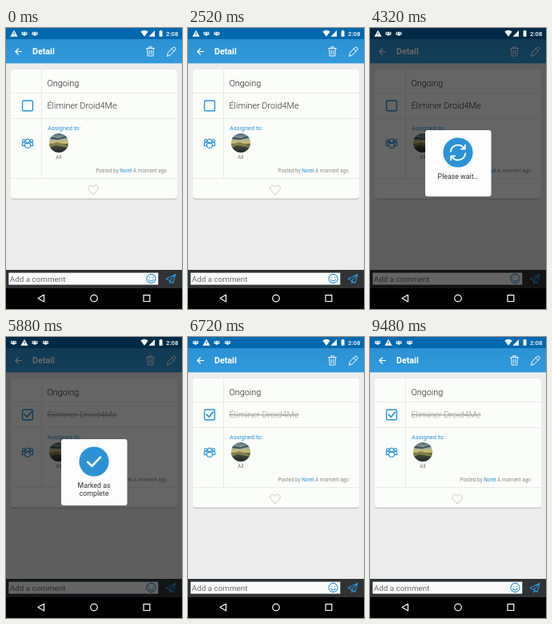
An HTML page that plays this animation: 220x352 px, repeating every 9.72 s.

```html
<!DOCTYPE html>
<html lang="en">
<head>
<meta charset="utf-8">
<style>
  html, body { margin: 0; width: 100%; height: 100%; overflow: hidden; background: #000; }
  svg { display: block; width: 220px; height: 352px; font-family: Roboto, sans-serif; }
  .line { fill: none; stroke-linecap: round; stroke-linejoin: round; }
  .blue { stroke: #2d91d2; }
  .white { stroke: #fff; }
</style>
</head>
<body>
<svg viewBox="0 0 220 352">
  <defs>
    <linearGradient id="sky" x2="0" y2="1">
      <stop offset="0" stop-color="#4d6a78"/>
      <stop offset=".3" stop-color="#9fae9f"/>
      <stop offset=".5" stop-color="#d6bf6c"/>
      <stop offset=".6" stop-color="#48503a"/>
      <stop offset="1" stop-color="#20282a"/>
    </linearGradient>
    <linearGradient id="bar" x2="0" y2="1">
      <stop offset="0" stop-color="#2b91d3"/>
      <stop offset="1" stop-color="#329adc"/>
    </linearGradient>
    <clipPath id="avatar"><circle cx="66" cy="144" r="12"/></clipPath>
    <g id="crew">
      <circle cx="-4.8" cy="-3.2" r="1.7"/><circle cx="4.8" cy="-3.2" r="1.7"/>
      <path d="M-3.4-.6H-6.7V3H-3.4M3.4-.6H6.7V3H3.4"/>
      <circle cy="-3" r="2.4"/>
      <path d="M-3.4 4V1.6Q-3.4 0-1.8 0H1.8Q3.4 0 3.4 1.6V4L1.8 5.8H-1.8Z"/>
    </g>
    <g id="alert">
      <path d="M0-4.3L4.6 3.8H-4.6Z" fill="#fff"/>
      <path d="M0-1.5V1.2M0 2.5V2.7" stroke="#0b5790" stroke-width="1.1"/>
    </g>
    <g id="badge" transform="scale(.52 .42)" fill="#fff" stroke="#fff" stroke-width=".4"><use href="#crew"/></g>
  </defs>

  <!-- page -->
  <rect width="220" height="352" fill="#ececec"/>
  <rect x="6" y="53" width="208" height="162" rx="3.5" fill="#c9c9c9"/>
  <rect x="6" y="52" width="208" height="161.5" rx="3.5" fill="#fbfdfb"/>
  <path d="M44.5 52V188M6 81.5H214M6 113.5H214M6 188.5H214" stroke="#e9ebe9" fill="none"/>
  <g font-size="10.85" font-weight="300">
    <text x="51.4" y="72.5" fill="#222">Ongoing</text>
    <text id="task" x="51.4" y="101">Éliminer Droid4Me</text>
  </g>
  <rect x="20.6" y="91" width="12.8" height="12.8" rx="1.4" class="line blue" stroke-width="1.4"/>
  <path id="tick" d="M23.3 97.2L26.2 100.2L31.5 94" class="line blue" stroke-width="1.7"/>
  <use href="#crew" x="27" y="144.4" class="line blue" stroke-width="1.1"/>
  <text x="52" y="128" font-size="7.5" fill="#2d91d2">Assigned to:</text>
  <g clip-path="url(#avatar)">
    <path d="M54 132H78V156H54Z" fill="url(#sky)"/>
    <path d="M54 146L64 143L78 148V150L62 147L54 150Z" fill="#81804d"/>
    <path d="M54 136L66 138L78 134V137L65 140L54 139Z" fill="#41535b"/>
  </g>
  <text x="66" y="164.3" font-size="6.4" fill="#777" text-anchor="middle">All</text>
  <text x="201" y="180.5" font-size="6.4" fill="#8b8b8b" text-anchor="end">Posted by <tspan fill="#2d91d2">Norel</tspan> A moment ago</text>
  <path d="M109 208.3C105 205 102.8 203.3 102.8 200.5C102.8 196.6 107.4 196 109 199.4C110.6 196 115.2 196.6 115.2 200.5C115.2 203.3 113 205 109 208.3Z" class="line" stroke="#c6c9c7"/>

  <!-- toolbar -->
  <rect y="14" width="220" height="30.3" fill="url(#bar)"/>
  <path d="M19.5 29.5H12M15.3 26L11.8 29.5L15.3 33" class="line white" stroke-width="1.2"/>
  <text x="33" y="33.2" font-size="10.7" font-weight="700" fill="#fff">Detail</text>
  <path d="M175.5 25.5H185.5M178.7 25.3V23.6H182.3V25.3M176.6 25.7L177.1 35H183.9L184.4 25.7M179.2 28V32.8M181.8 28V32.8" class="line white" stroke-width=".9"/>
  <path d="M201.5 35L202.5 30.8L208.7 24.4Q210.2 23.3 211.5 24.7Q212.8 26.1 211.6 27.5L205.5 33.8ZM207.2 26L210 28.9" class="line white" stroke-width="1"/>

  <rect width="220" height="14" fill="#0069ae"/>

  <!-- comment bar -->
  <rect y="303" width="220" height="23" fill="#303234"/>
  <rect x="3.3" y="306.6" width="187" height="15" fill="#fafafa"/>
  <text x="4.8" y="317.8" font-size="9.85" fill="#6c6c6c">Add a comment</text>
  <g class="line blue" stroke-width="1.1">
    <circle cx="181.5" cy="314" r="5.6"/>
    <path d="M179.4 312.2V312.5M183.6 312.2V312.5M178.6 315.4Q181.5 318.6 184.4 315.4"/>
    <path d="M200 314.2L212 308.5L208.8 319.5L204.8 316.4ZM212 308.5L204.8 316.4V320L206.7 317.9"/>
  </g>

  <rect id="shade" width="220" height="326"/>

  <!-- status icons stay bright above the shade -->
  <g id="before">
    <use href="#alert" x="10" y="7"/><use href="#badge" x="23" y="7"/><use href="#badge" x="36" y="7"/>
  </g>
  <g id="after">
    <use href="#badge" x="9.5" y="7"/><use href="#alert" x="23" y="7"/>
    <use href="#badge" x="36" y="7"/><use href="#badge" x="49.5" y="7"/>
  </g>
  <g fill="#fff">
    <path d="M168.3 4.5Q173 1 177.7 4.5L173 10.8ZM186 3V10.8H178.4Z"/>
    <path d="M191.6 3.6H192.7V2.7H194.3V3.6H195.5V10.8H191.6Z"/>
    <text x="200" y="10.2" font-size="7.8" font-weight="500">2:08</text>
  </g>

  <!-- navigation -->
  <rect y="326" width="220" height="26"/>
  <g class="line white" stroke-width="1.2">
    <path d="M47.5 334.3V342.9L40 338.6Z"/>
    <circle cx="110" cy="338.6" r="4.3"/>
    <path d="M172 334.7H179.8V342.5H172Z"/>
  </g>

  <!-- dialog -->
  <g id="dialog" text-anchor="middle" font-size="8.8" fill="#333">
    <rect x="69" y="128" width="82.5" height="83" rx="3" fill="#fdfdfd"/>
    <circle cx="110" cy="156" r="18.6" fill="#2d92d5"/>
    <g id="waiting">
      <g id="spinner" class="line white" stroke-width="1.8">
        <path id="arrow" d="M-9.2-1.2A9.2 9.2 0 0 1 7.5-5.4M8.8-9.4V-4.4H3.8"/>
        <use href="#arrow" transform="rotate(180)"/>
      </g>
      <text x="110" y="188.5">Please wait…</text>
    </g>
    <g id="done">
      <path d="M102.2 156.6L107.4 161.8L118 150.6" class="line white" stroke-width="2.7"/>
      <text x="110" y="188.5">Marked as</text>
      <text x="110" y="199">complete</text>
    </g>
  </g>
</svg>
<script>
  const LOOP = 9720, OPEN = 3660, COMPLETE = 5280, CLOSE = 6360;
  const el = id => document.getElementById(id);
  const show = (id, on) => el(id).style.display = on ? '' : 'none';
  const ramp = (t, start, length) => Math.min(1, Math.max(0, (t - start) / length));

  function draw(now) {
    const t = now % LOOP, complete = t >= COMPLETE;
    const closing = ramp(t, CLOSE, 220);
    for (const id of ['before', 'waiting']) show(id, !complete);
    for (const id of ['after', 'done', 'tick']) show(id, complete);

    el('task').setAttribute('fill', complete ? '#999' : '#333');
    el('task').setAttribute('text-decoration', complete ? 'line-through' : 'none');
    el('shade').setAttribute('opacity', .6 * (ramp(t, OPEN, 270) - closing));
    el('dialog').setAttribute('opacity', ramp(t, OPEN, 150) - closing);
    el('spinner').setAttribute('transform', `translate(110 156) rotate(${(t - 4320) * .18})`);
    requestAnimationFrame(draw);
  }
  draw(performance.now());
</script>
</body>
</html>
```
